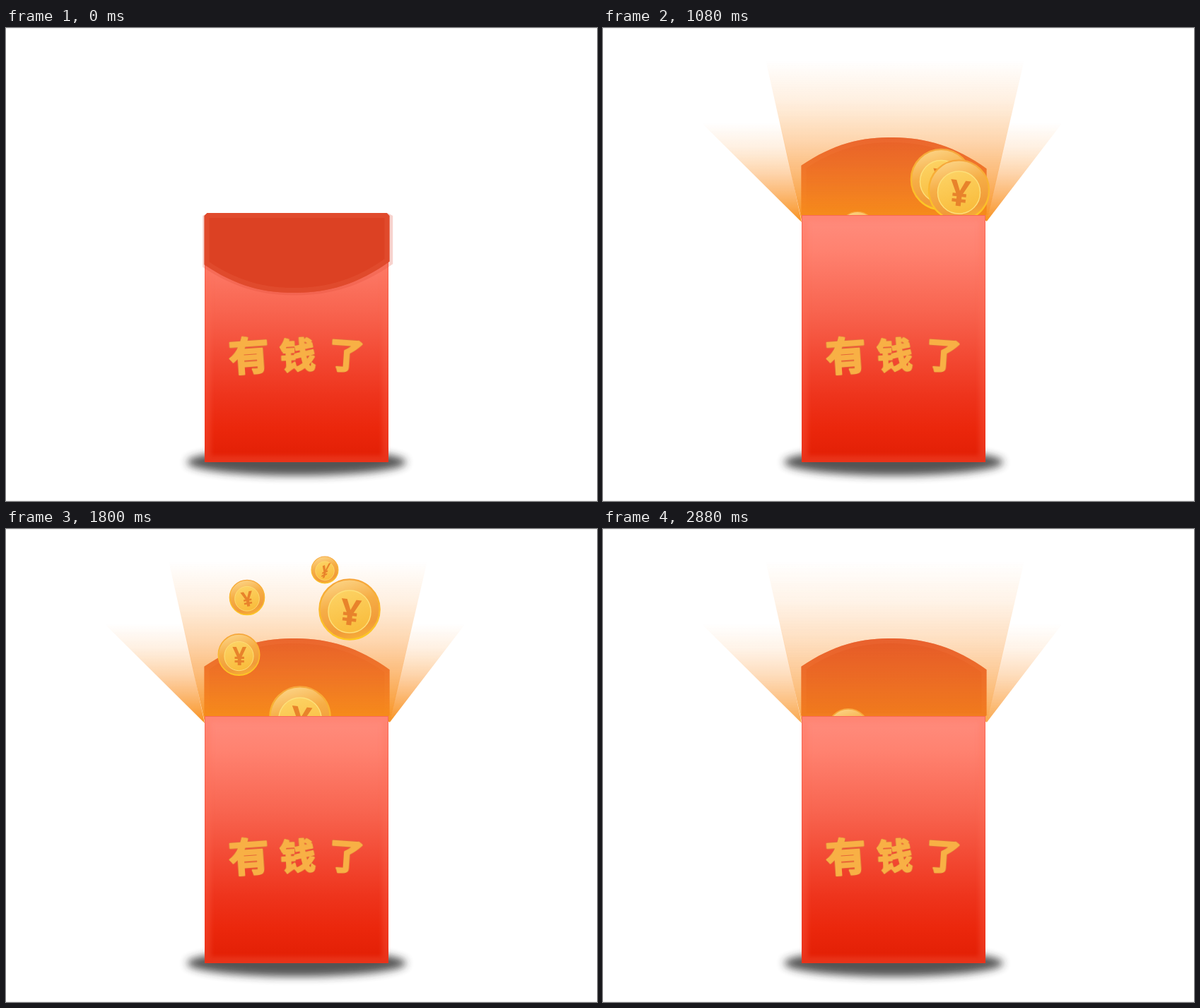
Write an HTML page that moves like this. It is 836 px wide and 670 px high and loops after 2920 ms.

```html
<!DOCTYPE html>
<html lang="zh">
<head>
<meta charset="utf-8">
<title>有钱了</title>
<style>
  html, body { margin: 0; width: 100%; height: 100%; overflow: hidden; background: #fff; }
  svg { display: block; width: 836px; height: 670px; }
  text { text-anchor: middle; }
  .title { font: 900 56px "Noto Sans CJK SC", "Noto Sans CJK", sans-serif; fill: #f8b045; stroke: #f8b045; stroke-width: 2.6px; stroke-linejoin: round; filter: drop-shadow(0 0 .6px #a5552a); }
  .yen { font: bold 51px "Open Sans", "Noto Sans", sans-serif; fill: #e8832b; }
</style>
</head>
<body>
<svg viewBox="0 0 836 670">
  <defs>
    <linearGradient id="red" x2="0" y2="1">
      <stop offset="0" stop-color="#ff8d7e"/>
      <stop offset=".14" stop-color="#ff8270"/>
      <stop offset=".39" stop-color="#f8644f"/>
      <stop offset=".56" stop-color="#f34b35"/>
      <stop offset=".73" stop-color="#ee341c"/>
      <stop offset=".86" stop-color="#eb270c"/>
      <stop offset="1" stop-color="#e11e04"/>
    </linearGradient>
    <linearGradient id="light" x2="0" y2="1">
      <stop offset="0" stop-color="#fd9a38" stop-opacity="0"/>
      <stop offset=".25" stop-color="#fd9a38" stop-opacity=".15"/>
      <stop offset=".5" stop-color="#fc9632" stop-opacity=".4"/>
      <stop offset=".72" stop-color="#fa9226" stop-opacity=".66"/>
      <stop offset="1" stop-color="#f78f18"/>
    </linearGradient>
    <linearGradient id="rim" x1=".35" x2=".65" y2="1">
      <stop offset="0" stop-color="#fcd384"/>
      <stop offset=".4" stop-color="#f6ae46"/>
      <stop offset=".8" stop-color="#f19a38"/>
      <stop offset="1" stop-color="#f8b238"/>
    </linearGradient>
    <linearGradient id="edge" x2="0" y2="1">
      <stop offset="0" stop-color="#f6a63c"/>
      <stop offset="1" stop-color="#fdc923"/>
    </linearGradient>
    <linearGradient id="face" x2=".3" y2="1">
      <stop offset="0" stop-color="#fdd467"/>
      <stop offset="1" stop-color="#f9bd3e"/>
    </linearGradient>
    <filter id="soft" x="-20%" y="-100%" width="140%" height="300%"><feGaussianBlur stdDeviation="6"/></filter>
    <filter id="haze"><feGaussianBlur stdDeviation="3"/></filter>
    <clipPath id="front"><rect x="281" y="265" width="260" height="350"/></clipPath>
    <clipPath id="flapClip"><path id="flapMask"/></clipPath>
    <g id="coin">
      <circle r="42.5" fill="url(#rim)" stroke="url(#edge)" stroke-width="2.4"/>
      <circle cy="3" r="30" fill="url(#face)" stroke="#fde07a" stroke-width="1.4"/>
    </g>
  </defs>

  <rect width="836" height="670" fill="#fff"/>
  <path d="M0 .5H836M0 669.5H836" stroke="#efefef"/>
  <ellipse cx="411" cy="615" rx="155" ry="19" fill="#2c2c2c" opacity=".8" filter="url(#soft)"/>

  <g id="back"></g>
  <g id="rays" fill="url(#light)"><path/><path/><path/></g>
  <g id="coins"></g>

  <g id="body">
    <rect x="281" y="265" width="260" height="350" fill="url(#red)"/>
    <g clip-path="url(#front)">
      <rect x="281" y="265" width="260" height="350" fill="none" stroke="#ff6d58" stroke-opacity=".25" stroke-width="18" filter="url(#haze)"/>
      <rect x="281" y="265" width="260" height="350" fill="none" stroke="#ee3522" stroke-opacity=".35" stroke-width="2"/>
    </g>
    <text class="title" transform="translate(345 484) rotate(-4) scale(1.02 .98)">有</text>
    <text class="title" transform="translate(413.5 482) rotate(-3) scale(.9)">钱</text>
    <text class="title" transform="translate(480.5 482) rotate(4) scale(.9)">了</text>
  </g>

  <g id="top">
    <g id="flap">
      <path id="glow" fill="#dd4a33" fill-opacity=".24"/>
      <path id="sheet" fill="#dc4123"/>
      <path id="trim" fill="none" stroke="#e65436" stroke-opacity=".5" stroke-width="14" clip-path="url(#flapClip)"/>
    </g>
  </g>
</svg>
<script>
const LOOP = 2920, STEP = 40, HINGE = 265, MID = 411.5, DEPTH = 525;
const $ = id => document.getElementById(id);
const clamp = v => Math.max(0, Math.min(1, v));
const mix = (a, b, p) => a + (b - a) * p;

// Each coin: radius, tilt, skew and stops of [time, x, y].
const coins = [
  { r: 19.5, tilt: -22, skew: -35, path: [[1080, 476, 299], [1400, 465, 192], [1800, 451, 58], [1880, 448, 31], [2400, 468, 226], [2640, 477, 316]] },
  { r: 25.3, tilt: -10, skew: 0, path: [[1080, 360, 285], [1400, 352, 202], [1800, 341, 97], [1880, 339, 76], [2400, 354, 260], [2520, 357, 302]] },
  { r: 30, tilt: 0, skew: 0, path: [[1280, 331, 309], [1400, 331, 280], [1800, 329.5, 178], [2160, 329, 87], [2400, 337, 152], [2880, 347, 284], [2920, 348, 295]] },
  { r: 43.8, tilt: 7, skew: 0, path: [[840, 492, 307], [1080, 478.5, 214.5], [1400, 460, 91.5], [1800, 416, 266], [1920, 403, 318]] },
  { r: 43.8, tilt: 7, skew: 0, path: [[840, 496, 313], [1080, 503.5, 230], [1400, 514, 119], [1600, 518, 50], [1800, 486, 114], [2420, 390, 316]] }
];

for (const c of coins) {
  $('coins').insertAdjacentHTML('beforeend',
    `<g><use href="#coin"/><text class="yen" transform="translate(1 4) rotate(${c.tilt}) skewX(${c.skew}) translate(0 18)">¥</text></g>`);
  c.node = $('coins').lastElementChild;
}

function along(path, t) {
  const i = path.findIndex(s => s[0] > t);
  if (i < 1) return null;
  const [a, b] = [path[i - 1], path[i]], p = (t - a[0]) / (b[0] - a[0]);
  return [mix(a[1], b[1], p), mix(a[2], b[2], p)];
}

// Outline of the flap turned about its hinge, seen in perspective.
function flapPath(angle, grow = 0, shift = 0) {
  const pts = [[-127, -3], [-131 - grow, 1]];
  for (let i = -16; i <= 16; i++) {
    const u = i / 16;
    pts.push([u * (131 + grow), 68 + grow - 2.2 * u + 42 * (1 - Math.abs(u) ** 2.2)]);
  }
  pts.push([131 + grow, 1], [127, -3]);
  return 'M' + pts.map(([x, y]) => {
    const k = DEPTH / (DEPTH - y * Math.sin(angle));
    return (MID + shift + x * k).toFixed(2) + ' ' + (HINGE + y * Math.cos(angle) * k).toFixed(2);
  }).join('L') + 'Z';
}

function drawFlap(t) {
  const angle = Math.PI * (1 - Math.cos(Math.PI * clamp((t - 260) / 300))) / 2;
  const home = $(angle > Math.PI / 2 ? 'back' : 'top');
  if ($('flap').parentNode !== home) home.append($('flap'));
  const d = flapPath(angle);
  for (const id of ['sheet', 'trim', 'flapMask']) $(id).setAttribute('d', d);
  $('glow').setAttribute('d', flapPath(angle, 3.5, 1.2));
  $('glow').setAttribute('opacity', 1 - clamp((t - 540) / 60));
}

function drawRays(t) {
  const s = clamp((t - 560) / 380);
  const up = (x, y, tx, ty) => mix(x, tx, s) + ' ' + mix(y, ty, s);
  const [left, centre, right] = $('rays').children;
  left.setAttribute('d', `M281 275L${up(281, 275, 139, 134)}L${up(281, 275, 251, 134)}Z`);
  centre.setAttribute('d', `M281 273L${up(281, 273, 230, 45)}L${up(543, 273, 596, 45)}L543 273Z`);
  right.setAttribute('d', `M542 275L${up(542, 275, 650, 134)}L${up(542, 275, 575, 134)}Z`);
  const pulse = t < 1010 ? 1 : .875 + .125 * Math.cos(2 * Math.PI * (t - 1010) / 720);
  $('rays').setAttribute('opacity', s ? pulse : 0);
}

function drawCoins(t) {
  for (const c of coins) {
    const p = along(c.path, t);
    c.node.setAttribute('visibility', p ? 'visible' : 'hidden');
    if (p) c.node.setAttribute('transform', `translate(${p}) scale(${c.r / 43.7})`);
  }
}

const begin = performance.now();
function frame() {
  const now = Math.max(0, performance.now() - begin) % LOOP;
  const t = Math.floor(now / STEP) * STEP;
  drawFlap(t);
  drawRays(t);
  drawCoins(t);
  requestAnimationFrame(frame);
}
frame();
</script>
</body>
</html>
```
